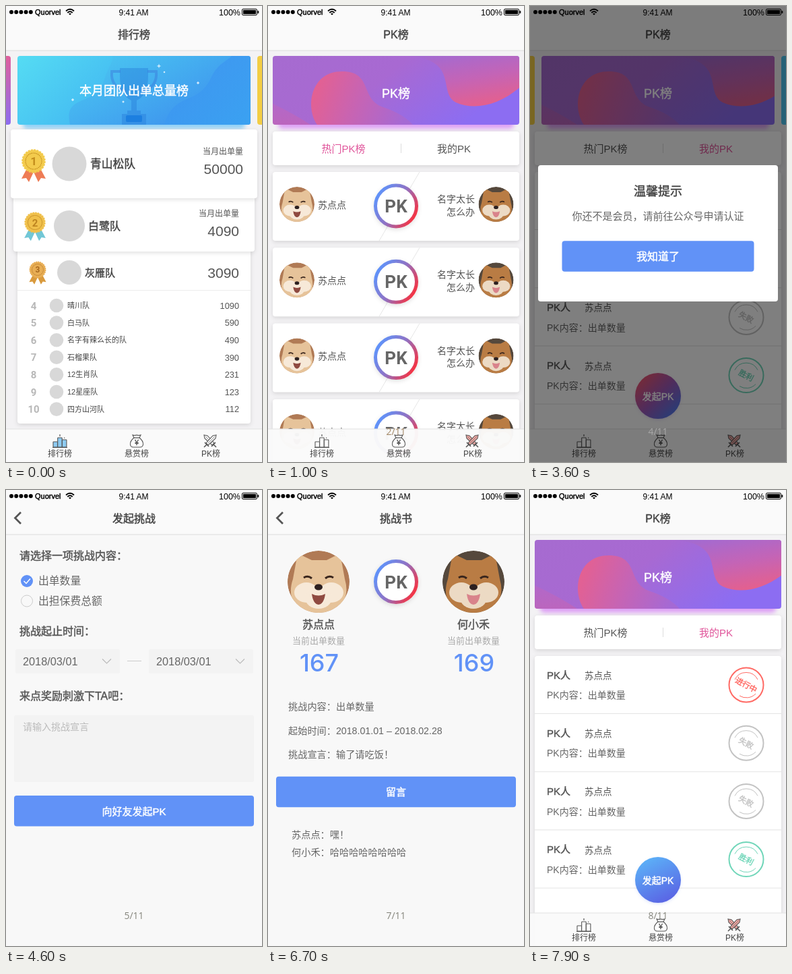
These frames come from a looping animation (380x676 px, 8000 ms). An HTML page:

```html
<!DOCTYPE html>
<html lang="zh">
<head>
<meta charset="utf-8">
<style>
  html, body { margin: 0; width: 100%; height: 100%; overflow: hidden; background: #f4f4f4; }
  svg { display: block; width: 100%; height: 100%; }
  text { font-family: "Liberation Sans", "Noto Sans CJK SC", "Noto Sans CJK", sans-serif; stroke-width: 0; }
  .medium { stroke-width: .45px; }
  .count { font-family: "Open Sans", sans-serif; }
  .rank { font-family: Roboto, sans-serif; font-weight: bold; }
  .score { font-family: Inter, sans-serif; font-weight: 500; }
  .card { filter: drop-shadow(0 2px 3px rgba(0, 0, 0, .12)); }
  .glow { filter: blur(3px); }
</style>
</head>
<body>
<svg id="stage" viewBox="0 0 380 676"></svg>
<script>
const INK = '#555', BLUE = '#6192f7', PINK = '#e0559b';
const ME = '苏点点', RIVAL = '何小禾';
const MEDIUM = 'class="medium"', RANK = 'class="rank"';

// ---- basic shapes ----
const text = (x, y, s, size, fill = INK, anchor = 'start', extra = '') =>
  `<text x="${x}" y="${y + size * .37}" font-size="${size}" fill="${fill}" stroke="${fill}" text-anchor="${anchor}" ${extra}>${s}</text>`;
const mid = (x, y, s, size, fill, extra) => text(x, y, s, size, fill, 'middle', extra);
const end = (x, y, s, size, fill, extra) => text(x, y, s, size, fill, 'end', extra);
const rect = (x, y, w, h, fill, r = 0, extra = '') =>
  `<rect x="${x}" y="${y}" width="${w}" height="${h}" rx="${r}" fill="${fill}" ${extra}/>`;
const circle = (x, y, r, fill, extra = '') => `<circle cx="${x}" cy="${y}" r="${r}" fill="${fill}" ${extra}/>`;
const ellipse = (x, y, rx, ry, fill) => `<ellipse cx="${x}" cy="${y}" rx="${rx}" ry="${ry}" fill="${fill}"/>`;
const path = (d, fill = 'none', stroke = 'none', width = 1, extra = '') =>
  `<path d="${d}" fill="${fill}" stroke="${stroke}" stroke-width="${width}" ${extra}/>`;
const group = (x, y, body, scale = 1) => `<g transform="translate(${x} ${y}) scale(${scale})">${body}</g>`;
const card = (x, y, w, h, r = 4) => rect(x, y, w, h, '#fff', r, 'class="card"');
const line = (x1, y1, x2, y2, color = '#e4e4e4', width = 1) => path(`M${x1} ${y1}L${x2} ${y2}`, 'none', color, width);

const gradient = (id, [x1, y1, x2, y2], ...colors) =>
  `<linearGradient id="${id}" x1="${x1}" y1="${y1}" x2="${x2}" y2="${y2}">` +
  colors.map((c, i) => `<stop offset="${i / (colors.length - 1)}" stop-color="${c}"/>`).join('') + '</linearGradient>';

const defs = '<defs>' +
  gradient('sky', [0, 0, 1, .3], '#55dcf3', '#45bdf2', '#3d94ee') +
  gradient('deep', [0, 0, 1, 1], '#3d8af0', '#3aa9f2') +
  gradient('wave', [0, 0, 1, 1], '#4cc8f0', '#3b86ee') +
  gradient('violet', [0, 0, 1, .35], '#a66bd0', '#a869d2', '#8c6df2') +
  gradient('blob', [0, .3, 1, .5], '#e6608f', '#c664b4', '#a569d4') +
  gradient('corner', [.2, 0, .6, 1], '#a46ad0', '#c464b6', '#e4608e') +
  gradient('fog', [0, 0, 0, 1], '#b867c8', '#cf62aa') +
  gradient('ring', [0, .2, 1, .8], '#5b96ff', '#8f72c4', '#ff2d36') +
  gradient('start', [.2, 0, .7, 1], '#5cb4f8', '#5a63e4') +
  gradient('startWarm', [.1, .1, .9, .9], '#f0556f', '#a158b8', '#4f7af0') +
  gradient('peek', [0, 0, 0, 1], '#e0609c', '#8d6df0') +
  '<clipPath id="disc"><circle r="46"/></clipPath>' +
  '<clipPath id="wide"><rect x="7" y="74" width="366" height="102" rx="4"/></clipPath>' +
  '<clipPath id="inset"><rect x="17" y="74" width="346" height="102" rx="4"/></clipPath></defs>';

// ---- shared pieces ----
const statusBar = () =>
  [8, 15.2, 22.4, 29.6, 36.8].map(x => circle(x, 9, 3, '#000')).join('') +
  text(43, 9, 'Quorvel', 11, '#000', 'start', MEDIUM) +
  path('M89 7.5Q95 2 101 7.5M91.3 10Q95 6.5 98.7 10', 'none', '#000', 1.8) + path('M93 11.6Q95 9.8 97 11.6L95 13.6Z', '#000') +
  mid(189.5, 9.5, '9:41 AM', 12, '#000') + end(348, 9.5, '100%', 12.5, '#000') +
  rect(350.5, 4.5, 22, 9, 'none', 1.5, 'stroke="#000"') + rect(352, 6, 19, 6, '#000') + rect(373.5, 7, 1.8, 4, '#000', .8);

const header = (title, back) =>
  rect(0, 0, 380, 66, '#fafafa') + line(0, 66, 380, 66, '#dcdcdc') + statusBar() +
  mid(190, 42, title, 16, '#444', MEDIUM) + (back ? path('M22 33L13.5 41.5L22 50', 'none', '#555', 2.8) : '');

const podium = on => {
  const bar = (x, y, h) => rect(x, y, 6.5, h, on ? '#8ecbf2' : '#fff', .5, 'stroke="#555" stroke-width="1.1"');
  return bar(-10, 1, 8) + bar(-3.3, -5, 14) + bar(3.4, -2, 11) + line(-11, 9.5, 11, 9.5, '#555', 1.1) +
    line(0, -10, 0, -7, '#555', 1.2) + line(6.7, -5.5, 6.7, -4, '#555');
};
const moneyBag = () =>
  path('M-4 -5Q-10 0 -9.5 5Q-9 9 -5 9H5Q9 9 9.5 5Q10 0 4 -5Z', '#fff', '#555', 1.1) +
  path('M-4 -5L-6 -9Q-3 -8 0 -9Q3 -8 6 -9L4 -5Z', '#fff', '#555', 1.1) + mid(0, 2.5, '¥', 10, '#555', MEDIUM);
const swords = on => {
  const blade = path('M9 -9L4 -8L-6 3L-3 6L8 -4Z', on ? '#f3aaa5' : '#fff', '#555', 1.1) +
    path('M-8 2L-2 8M-5 5L-9 9', 'none', '#555', 1.6) + line(7, -7, -3, 3, '#555', .7);
  return `<g transform="scale(-1 1)">${blade}</g>` + blade;
};
const tabBar = active =>
  rect(0, 627, 380, 49, '#fafafa', 0, 'opacity=".97"') + line(0, 627, 380, 627, '#e2e2e2') +
  group(80, 645, podium(active === 0)) + group(194, 645, moneyBag()) + group(303, 645, swords(active === 2)) +
  ['排行榜', '悬赏榜', 'PK榜'].map((s, i) => mid([80, 194, 304][i], 664, s, 12, '#444')).join('');
const counter = (n, color = '#85857c') => mid(190, 631, n + '/11', 14, color, 'class="count"');
const button = (x, y, w, label, size = 15) =>
  rect(x, y, w, 45.5, BLUE, 4) + mid(x + w / 2, y + 23, label, size, '#fff', MEDIUM);

const dog = (x, y, r, [back, fur, light, mouth]) => group(x, y, '<g clip-path="url(#disc)">' +
  circle(0, 0, 46, back) + path('M-38 -4L-31 -42L-10 -32H12L32 -42L39 -4Q48 26 24 42L20 50H-22L-26 42Q-48 26 -38 -4Z', fur) +
  ellipse(-18, 16, 18, 15, light) + ellipse(19, 16, 18, 15, light) + ellipse(0, 24, 20, 16, light) +
  path('M-22 -6Q-16 -10 -10 -5M10 -5Q16 -10 22 -6', 'none', '#3a261d', 3) +
  ellipse(0, 8, 6, 4.5, '#2c2020') + path('M-10 18Q0 23 10 18Q8 33 0 34Q-8 33 -10 18Z', mouth) + '</g>', r / 46);
const CREAM = ['#b07a55', '#e6c39a', '#f7e9d8', '#8f4a40'], TAN = ['#55483c', '#b97c44', '#ecdac4', '#d9838b'];

const pkBadge = (x, y) =>
  circle(x, y, 33, '#fff', 'class="card"') + circle(x, y, 30.5, '#fff', 'stroke="url(#ring)" stroke-width="5"') +
  mid(x, y, 'PK', 26, '#666', RANK);

const pkBanner = (inset, dx) => {
  const x = inset ? 17 : 7, w = 380 - 2 * x;
  return rect(x + 8, 160, w - 16, 22, '#dda0f4', 6, 'class="glow"') +
    `<g clip-path="url(#${inset ? 'inset' : 'wide'})">` + rect(x, 74, w, 102, 'url(#violet)') +
    group(dx, 0, path('M-20 130Q30 150 70 176H-20Z', 'url(#fog)', 'none', 1, 'opacity=".5"') +
      path('M80 176C62 150 70 97 117 97C163 97 143 138 178 150Q208 160 222 176Z', 'url(#blob)') +
      path('M215 74C292 80 258 128 286 143C316 156 355 146 388 114V74Z', 'url(#corner)')) + '</g>' +
    (inset ? rect(-10, 74, 17, 102, '#f3cd45', 4) + rect(373, 74, 17, 102, '#4cc6f0', 4) : '') +
    mid(190, 129, 'PK榜', 18, '#fff', MEDIUM);
};
const pkTabs = mine => card(7, 186, 366, 50) + mid(112, 211, '热门PK榜', 15, mine ? INK : PINK) +
  line(197.5, 204, 197.5, 218, '#ddd') + mid(276, 211, '我的PK', 15, mine ? PINK : INK);

const stamp = (y, label, color) => group(321, y,
  circle(0, 0, 25.5, 'none', `stroke="${color}" stroke-width="2"`) +
  path('M-17 -8A19 19 0 0 1 17 -8M-10 16A19 19 0 0 0 14 13', 'none', color, 1) +
  `<g transform="rotate(28)">${mid(0, 0, label, 11.5, color, MEDIUM)}</g>`);

// ---- screens ----
const page = (body, bg = '#f3f2f4') => rect(0, 0, 380, 676, bg) + body;

const medal = (x, y, s, n, gold, dark, ribbon) => group(x, y,
  path('M-9 9L-18 26L-11 25L-7 31L1 14ZM9 9L18 26L11 25L7 31L-1 14Z', ribbon) +
  circle(0, 0, 16.5, gold, `stroke="${gold}" stroke-width="2.5" stroke-dasharray="3 1.3"`) +
  circle(0, 0, 12, 'none', `stroke="${dark}" stroke-width="1.2" stroke-dasharray="1.5 1"`) +
  mid(0, 0, n, 17, dark, RANK), s);

const trophy = path('M169 92H211V104Q211 132 194 140V155H200V160H208V176H172V160H180V155H186V140Q169 132 169 104Z', '#2578d8', 'none', 1, 'opacity=".4"') +
  path('M170 97H157Q155 121 178 126M210 97H223Q225 121 202 126', 'none', '#3a7fdd', 4, 'opacity=".5"') + rect(178, 162, 24, 10, '#1c7fe0', 2);

const podiumRow = (y, name, size, nameX, avatarX, r, score, scoreX, scoreY) =>
  circle(avatarX, y, r, '#d8d8d8') + text(nameX, y, name, size, '#444', 'start', MEDIUM) + end(scoreX, scoreY, score, 21, INK);

const teams = [['晴川队', 1090], ['白马队', 590], ['名字有辣么长的队', 490], ['石榴果队', 390],
  ['12生肖队', 231], ['12星座队', 123], ['四方山河队', 112]];

const ranking = page(
  rect(25, 160, 330, 22, '#8fd0f5', 6, 'class="glow"') +
  '<g clip-path="url(#inset)">' + rect(17, 74, 346, 102, 'url(#sky)') +
  path('M95 176C85 130 130 150 145 112C152 88 160 84 158 74H363V176Z', 'url(#wave)', 'none', 1, 'opacity=".65"') +
  path('M235 176C250 125 285 150 305 105C315 85 325 84 335 74H363V176Z', 'url(#deep)', 'none', 1, 'opacity=".75"') + trophy + '</g>' +
  [[227, 89, 2.5], [285, 114, 2], [174, 142, 1.5], [99, 139, 2], [235, 98, 1.2]].map(([x, y, r]) =>
    path(`M${x - r} ${y}h${2 * r}M${x} ${y - r}v${2 * r}`, 'none', '#fff', 1)).join('') +
  mid(190, 125, '本月团队出单总量榜', 18, '#fff', MEDIUM) +
  rect(-10, 74, 17, 102, 'url(#peek)', 4) + rect(373, 74, 17, 102, '#f3cd45', 4) +
  card(17, 360, 346, 259) + line(17, 421.5, 363, 421.5, '#ececec') + card(11, 280, 358, 84) + card(7, 183, 366, 102) +
  medal(41, 230, 1, 1, '#f3cb4d', '#c38d1c', '#ee7c55') + medal(43, 321, .88, 2, '#f0c04b', '#bd8420', '#72c7d6') +
  medal(47, 391, .7, 3, '#e8ae55', '#a8691f', '#d99a3d') +
  podiumRow(234, '青山松队', 16.8, 125, 94, 25.5, '50000', 352, 241) +
  podiumRow(326, '白鹭队', 16, 122, 94, 23, '4090', 346, 333) +
  podiumRow(395, '灰雁队', 15, 117, 94, 18, '3090', 346, 395) +
  end(352, 216, '当月出单量', 12) + end(346, 308, '当月出单量', 12) +
  teams.map(([name, score], i) => {
    const y = 444 + i * 25.6;
    return mid(41, y, i + 4, 15, '#b8b8b8', RANK) + circle(75, y, 10.3, '#d8d8d8') +
      text(91, y, name, 11, '#444') + end(346, y, score, 12.8);
  }).join('') + header('排行榜') + tabBar(0));

const hotPk = page(pkBanner(false, -7) + pkTabs(false) +
  [0, 1, 2, 3].map(i => group(0, i * 112.3, card(7, 246, 366, 102) + line(225, 246, 165, 348, '#e6e6e6') +
    dog(43, 294, 26, CREAM) + dog(338.5, 294, 26, TAN) + pkBadge(190, 296.5) + text(74, 294.5, ME, 14) +
    end(307, 286, '名字太长', 14) + end(307, 304.5, '怎么办', 14))).join('') +
  header('PK榜') + tabBar(2) + counter(2, '#a58a68'));

const myPk = (inset, buttonFill, buttonGlow) => page(pkBanner(inset, 0) + pkTabs(true) + card(7, 246, 366, 430) +
  [['进行中', '#ff6a64'], ['失败', '#c3c3c3'], ['失败', '#c3c3c3'], ['胜利', '#70d6b9']].map(([label, color], i) =>
    group(0, i * 86.2, text(25, 274, 'PK人', 15, INK, 'start', MEDIUM) + text(81, 275, ME, 13.5) +
      text(25, 304, 'PK内容：出单数量', 14, '#666') + stamp(289, label, color) + line(7, 331.5, 373, 331.5))).join('') +
  header('PK榜') + tabBar(2) + circle(190, 580, 31, buttonGlow, 'class="glow" opacity=".5"') +
  circle(190, 578, 34, `url(#${buttonFill})`) + mid(190, 578.5, '发起PK', 14, '#fff', MEDIUM));

const dialog = (n, height, title, message, buttons) => myPk(true, 'startWarm', '#9a6be0') +
  rect(0, 0, 380, 676, '#000', 0, 'opacity=".5"') + rect(12, 236, 356, height, '#fff', 4) +
  mid(190, 274, title, 18, '#444', MEDIUM) + mid(190, 311, message, 15, '#666') +
  buttons.map((label, i) => button(47.5, 348.3 + i * 61, 285, label, 16)).join('') + counter(n, '#a8a8a8');

const dateBox = x => rect(x, 236, 155, 36, '#f3f3f3', 3) + text(x + 11, 254, '2018/03/01', 16.3, '#666') +
  path(`M${x + 129} 250.5l6.5 6.5l6.5 -6.5`, 'none', '#bbb', 1.2);
const heading = (y, s) => text(20, y, s, 16, INK, 'start', MEDIUM);
const form = page(header('发起挑战', true) + heading(97, '请选择一项挑战内容：') +
  circle(31, 135, 9, BLUE) + path('M26.5 135L30 138.5L36 131.5', 'none', '#fff', 1.5) + text(48, 134, '出单数量', 15.8, '#666') +
  circle(31, 164.5, 8.5, 'none', 'stroke="#ccc"') + text(48, 164.5, '出担保费总额', 15.8, '#666') +
  heading(209, '挑战起止时间：') + dateBox(14) + line(180, 253.5, 201, 253.5, '#ccc') + dateBox(212) +
  heading(305, '来点奖励刺激下TA吧：') + rect(12, 334, 356, 99, '#f3f3f3', 3) + text(25, 351, '请输入挑战宣言', 14, '#bbb') +
  button(12, 453, 356, '向好友发起PK') + counter(5), '#f8f8f8');

const player = (x, name, score, palette) => dog(x, 136, 46, palette) + mid(x, 199, name, 16, INK, MEDIUM) +
  (score ? mid(x, 223, '当前出单数量', 13, '#aaa') + mid(x + 1, 256, score, 36, BLUE, 'class="score"') : '');
const challenge = (n, scores, label, messages) => page(header('挑战书', true) +
  player(75, ME, scores[0], CREAM) + player(305, RIVAL, scores[1], TAN) + pkBadge(190, 136) +
  ['挑战内容：出单数量', '起始时间：2018.01.01 – 2018.02.28', '挑战宣言：输了请吃饭！'].map((s, i) =>
    text(30, 321 + i * 35.5, s, 14.2, '#666')).join('') + button(12, 424.7, 356, label) +
  messages.map((s, i) => text(35, 511 + i * 25.5, s, 14.2, '#666')).join('') + counter(n), '#f8f8f8');

const timeline = [
  [0, ranking],
  [1000, hotPk],
  [2500, dialog(3, 251, '身份认证', '请选择你绑定的一个公众号进行认证', ['青禾坊', '小鹿安铺'])],
  [3600, dialog(4, 202, '温馨提示', '你还不是会员，请前往公众号申请认证', ['我知道了'])],
  [4600, form],
  [5600, challenge(6, [], '接受挑战', [])],
  [6700, challenge(7, [167, 169], '留言', [ME + '：嘿！', RIVAL + '：哈哈哈哈哈哈哈哈'])],
  [7900, myPk(false, 'start', '#5a7cf0') + counter(8)]
];

const stage = document.getElementById('stage');
stage.innerHTML = defs + timeline.map(([, body]) => `<g class="screen" visibility="hidden">${body}</g>`).join('');
const screens = stage.querySelectorAll('.screen');
const begin = performance.now();
function draw() {
  const time = (performance.now() - begin) % 8000;
  const current = timeline.findLastIndex(([at]) => time >= at);
  screens.forEach((screen, i) => screen.setAttribute('visibility', i === current ? 'visible' : 'hidden'));
  requestAnimationFrame(draw);
}
draw();
</script>
</body>
</html>
```
